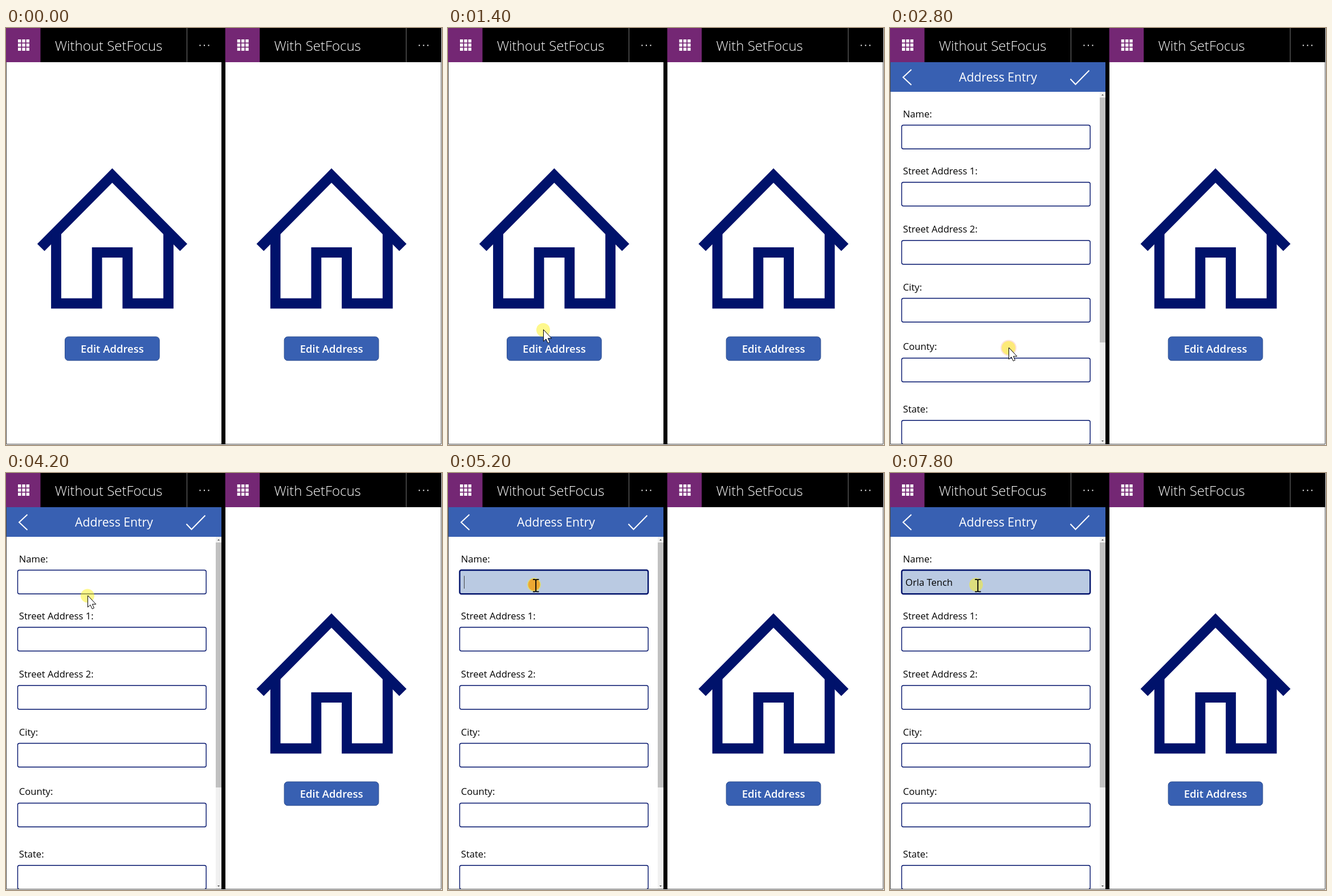
These frames come from a looping animation (765 by 732 pixels, 8000 ms). An HTML page:

```html
<!DOCTYPE html>
<html lang="en">
<head>
<meta charset="utf-8">
<title>SetFocus comparison</title>
<style>
  html, body { margin: 0; width: 100%; height: 100%; overflow: hidden; background: #fff; }
  svg { display: block; width: 100%; height: 100%; }
  text { font-family: "Open Sans", "Noto Sans", sans-serif; white-space: pre; }
  .title { font-size: 24px; font-weight: 300; fill: #fff; }
  .label { font-size: 16.6px; fill: #000; }
  .house { fill: none; stroke: #00126b; stroke-width: 17.8; }
  .house.hover { stroke: #334188; }
  .button rect { fill: #3860b2; stroke: #2d4d8e; }
  .button.hover rect { fill: #2d4d8e; stroke: #2f56a6; stroke-width: 1.5; }
  .button text { font-size: 18.5px; font-weight: 600; fill: #fff; text-anchor: middle; }
  .field { fill: #fff; stroke: #00126b; stroke-width: 1.4; }
  .field.hover { fill: #bacae2; }
  .field.focus { stroke-width: 2.4; }
</style>
</head>
<body>
<svg viewBox="0 0 765 732">
  <defs>
    <g id="bar">
      <rect width="60.5" height="60" fill="#742774"/>
      <path d="M21 22.8H41M21 30H41M21 37.2H41" stroke="#fff" stroke-width="5.4" stroke-dasharray="5.4 1.9"/>
      <path d="M317.5 0V60" stroke="#777"/>
      <path d="M339.5 30.5h2m5.5 0h2m5.5 0h2" stroke="#fff" stroke-width="2"/>
    </g>
    <g id="houseShape">
      <path d="M61.2 385.2L186.4 259L311.7 385.2"/>
      <path d="M88 361V483.5H159.7V394H213.3V483.5H285V361"/>
    </g>
    <clipPath id="page"><rect x="0" y="60" width="378" height="670"/></clipPath>
  </defs>

  <rect width="765" height="732" fill="#fff"/>
  <path d="M.5 60V730.5H763.5V60" fill="none" stroke="#444"/>
  <path d="M0 0H764V60H385V731H378V60H0Z"/>
  <use href="#bar"/>
  <use href="#bar" x="384.7"/>
  <text class="title" x="85.7" y="40.3">Without SetFocus</text>
  <text class="title" x="470.4" y="40.3">With SetFocus</text>

  <g id="home">
    <use id="house" class="house" href="#houseShape"/>
    <g id="button" class="button">
      <rect x="103.5" y="542" width="165.7" height="41.7" rx="6"/>
      <text x="186.4" y="569.5">Edit Address</text>
    </g>
  </g>
  <g transform="translate(384.7 0)">
    <use class="house" href="#houseShape"/>
    <g class="button">
      <rect x="103.5" y="542" width="165.7" height="41.7" rx="6"/>
      <text x="186.4" y="569.5">Edit Address</text>
    </g>
  </g>

  <g id="form" clip-path="url(#page)">
    <rect x="1" y="60" width="377" height="52" fill="#3860b2"/>
    <path d="M37.5 73L23 86.5L37.5 100M316.5 89.5L325.5 99L349.5 74.5" fill="none" stroke="#fff" stroke-width="2"/>
    <text x="189.5" y="94.3" font-size="21.2" fill="#fff" text-anchor="middle">Address Entry</text>
    <rect x="368" y="112" width="10" height="618" fill="#f1f1f1"/>
    <rect x="368" y="122" width="10" height="430" fill="#c1c1c1"/>
    <path d="M371 118.5l2-2.5 2 2.5zM371 724l2 2.5 2-2.5z" fill="#505050"/>
    <g id="fields"></g>
    <text id="typed" class="label" x="27" y="197.5"></text>
    <path id="caret" d="M0 180.5V203" stroke="#444"/>
  </g>

  <g id="pointer">
    <circle id="ring" r="14" fill="#f9a080" opacity=".3"/>
    <circle id="glow" r="12" fill="#fdf21a" opacity=".5"/>
    <circle id="press" fill="#f98400" opacity=".6"/>
    <path id="arrow" d="M.5 -.5V20L5 16L8.2 23L11.5 21.5L8.4 14.8H14.8Z" fill="#fff" stroke="#000"/>
    <path id="hand" d="M-.8 2.5C-.8 0 3 0 3 2.5V10.5C3.3 8.3 6.6 8.6 6.8 10.8C7.4 9.4 10 9.8 10.2 11.8C11 10.6 13.4 11.4 13.4 13.5V20C13.4 23 11 24.5 11 28.5H1.2C1 24 -3.5 21 -5.6 16.5C-6.6 14 -3.6 12.6 -2 15L-.8 17ZM3 10.5V15M6.8 11V15.5M10.2 12V16" fill="#fff" stroke="#000"/>
    <path id="beam" d="M-2 -9.2H1.6L3.2 -8L4.8 -9.2H8.5M3.2 -8V11.2M-2 12.4H1.6L3.2 11.2L4.8 12.4H8.5" fill="none" stroke="#000" stroke-width="1.8"/>
  </g>
</svg>

<script>
const LOOP = 8000, TICK = 200, FORM_AT = 2800, FOCUS_AT = 5000;
const NAME = "Orla Tench";
const $ = id => document.getElementById(id);

// label, label baseline, box top
const FIELDS = [
  ["Name:", 156.5, 170.5], ["Street Address 1:", 256.7, 270.7],
  ["Street Address 2:", 359, 373], ["City:", 460.5, 474.5],
  ["County:", 565.3, 579.5], ["State:", 675.3, 688.8]
];

// time, x, y
const MOVES = [
  [1000, 112, 470.5], [1200, 136, 503], [1400, 167, 530], [1600, 194, 552], [1800, 208, 561.5],
  [3600, 200, 528], [3800, 178, 428], [4000, 156, 326], [4200, 143, 215.5],
  [4400, 147, 175], [4600, 152, 199], [4800, 151, 196]
];

// time, press radius, ring shown
const CLICKS = [
  [0, 0, 0], [2400, 6, 0], [2600, 11, 0], [2800, 0, 1], [3000, 0, 0],
  [5000, 6, 0], [5200, 10.5, 0], [5400, 0, 1], [5600, 0, 0]
];

// time, letters typed
const TYPING = [
  [0, 0], [6200, 1], [6400, 2], [6600, 4], [6800, 5],
  [7000, 6], [7200, 8], [7400, 9], [7600, 10]
];

const svgEl = (tag, attrs, text = "") => {
  const el = document.createElementNS("http://www.w3.org/2000/svg", tag);
  for (const key in attrs) el.setAttribute(key, attrs[key]);
  el.textContent = text;
  $("fields").append(el);
  return el;
};
const boxes = FIELDS.map(([label, base, top]) => {
  svgEl("text", { class: "label", x: 22.8, y: base }, label);
  return svgEl("rect", { class: "field", x: 20.5, y: top, width: 330.7, height: 41.8, rx: 3 });
});

const at = (table, t) => table.findLast(row => row[0] <= t);
const show = (id, on) => $(id).style.display = on ? "" : "none";

function draw(t) {
  const onForm = t >= FORM_AT, focused = t >= FOCUS_AT;
  const move = at(MOVES, t), [, x, y] = move || [0, -99, -99];
  const inside = (l, top, r, b) => x >= l && x <= r && y >= top && y <= b;

  const onHouse = !onForm && inside(55, 246, 318, 495);
  const onButton = !onForm && inside(103, 541, 270, 585);
  show("home", !onForm);
  show("form", onForm);
  $("house").classList.toggle("hover", onHouse);
  $("button").classList.toggle("hover", onButton);

  let onField = false;
  boxes.forEach((box, i) => {
    const top = FIELDS[i][2], over = onForm && inside(20, top, 351, top + 42);
    onField ||= over;
    box.classList.toggle("hover", over);
    box.classList.toggle("focus", focused && i === 0);
  });

  $("typed").textContent = NAME.slice(0, at(TYPING, t)[1]);
  show("caret", focused && t < 7800);
  if (onForm) {
    const end = 28 + $("typed").getComputedTextLength();
    $("caret").setAttribute("transform", `translate(${Math.floor(end) + .5} 0)`);
  }

  const [, radius, ring] = at(CLICKS, t);
  show("pointer", move);
  $("pointer").setAttribute("transform", `translate(${x} ${y})`);
  $("press").setAttribute("r", radius);
  show("ring", ring);
  show("hand", onHouse);
  show("beam", onField);
  show("arrow", !onHouse && !onField);
}

const start = performance.now();
function frame(now) {
  const t = Math.max(0, now - start) % LOOP;
  draw(Math.floor(t / TICK) * TICK);
  requestAnimationFrame(frame);
}
draw(0);
requestAnimationFrame(frame);
</script>
</body>
</html>
```
